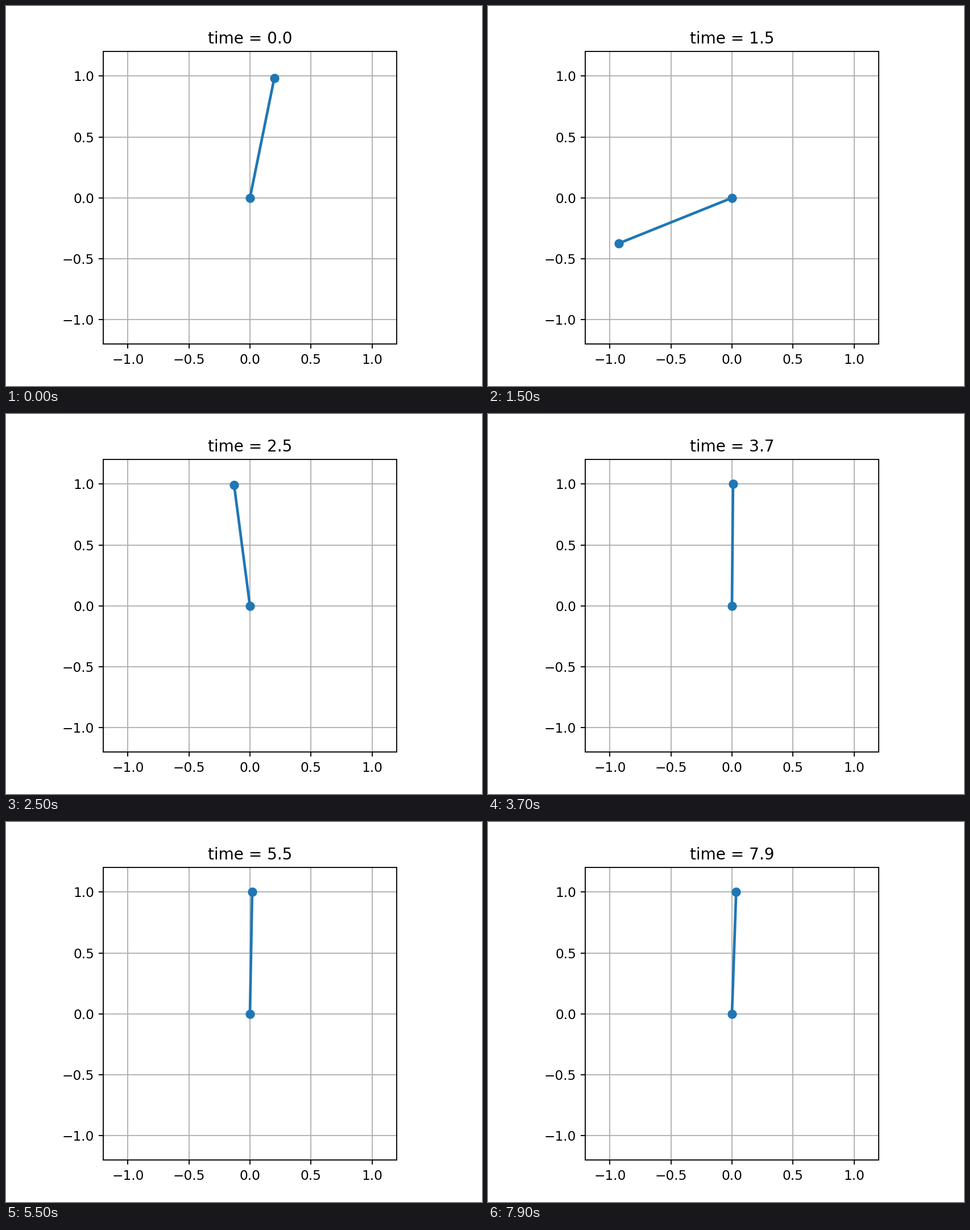
Recreate the animation shown at these times as a matplotlib script. Size 837 by 669 pixels, loop 8000 ms.

```python
import numpy as np
import matplotlib.pyplot as plt
from matplotlib.animation import FuncAnimation

DPI = 167.25
STEP = 0.1      # seconds per frame
FRAMES = 80
DECAY = 3.3     # settling rate near the top

# Angle (clockwise from upright) at key times of the swing-up.
KEY_T = np.array([0, 0.3, 0.6, 0.9, 1.2, 1.5, 1.8, 2.5])
KEY_ANGLE = np.array([0.2, 0.298, 0.675, 1.612, 2.947, 4.33, 5.253, 6.153])


def drift(t):
    """Slowly leaning upright pose that the arm settles into."""
    return 2 * np.pi + 0.0044 * np.exp(0.26 * t)


LOG_GAP = np.log(drift(KEY_T) - KEY_ANGLE)
SLOPE = np.gradient(LOG_GAP, KEY_T)
SLOPE[0], SLOPE[-1] = 0, -DECAY


def log_gap(t):
    if t >= KEY_T[-1]:
        return LOG_GAP[-1] - DECAY * (t - KEY_T[-1])
    i = np.searchsorted(KEY_T, t, side="right") - 1
    h = KEY_T[i + 1] - KEY_T[i]
    s = (t - KEY_T[i]) / h
    blend = s * s * (3 - 2 * s)
    return ((1 - blend) * LOG_GAP[i] + blend * LOG_GAP[i + 1]
            + h * s * (1 - s) * ((1 - s) * SLOPE[i] - s * SLOPE[i + 1]))


def angle(t):
    return drift(t) - np.exp(log_gap(t))


fig, ax = plt.subplots(figsize=(5.0045, 4), dpi=DPI)
ax.set(xlim=(-1.2, 1.2), ylim=(-1.2, 1.2), aspect="equal")
ticks = np.arange(-1, 1.1, 0.5)
ax.set_xticks(ticks)
ax.set_yticks(ticks)
ax.grid()
arm, = ax.plot([], [], "o-", lw=2)
title = ax.set_title("")


def update(frame):
    t = frame * STEP
    a = angle(t)
    arm.set_data([0, np.sin(a)], [0, np.cos(a)])
    title.set_text(f"time = {t:.1f}")
    return arm, title


anim = FuncAnimation(fig, update, frames=FRAMES, interval=1000 * STEP,
                     repeat=True, repeat_delay=0, blit=False)
plt.show()
```
